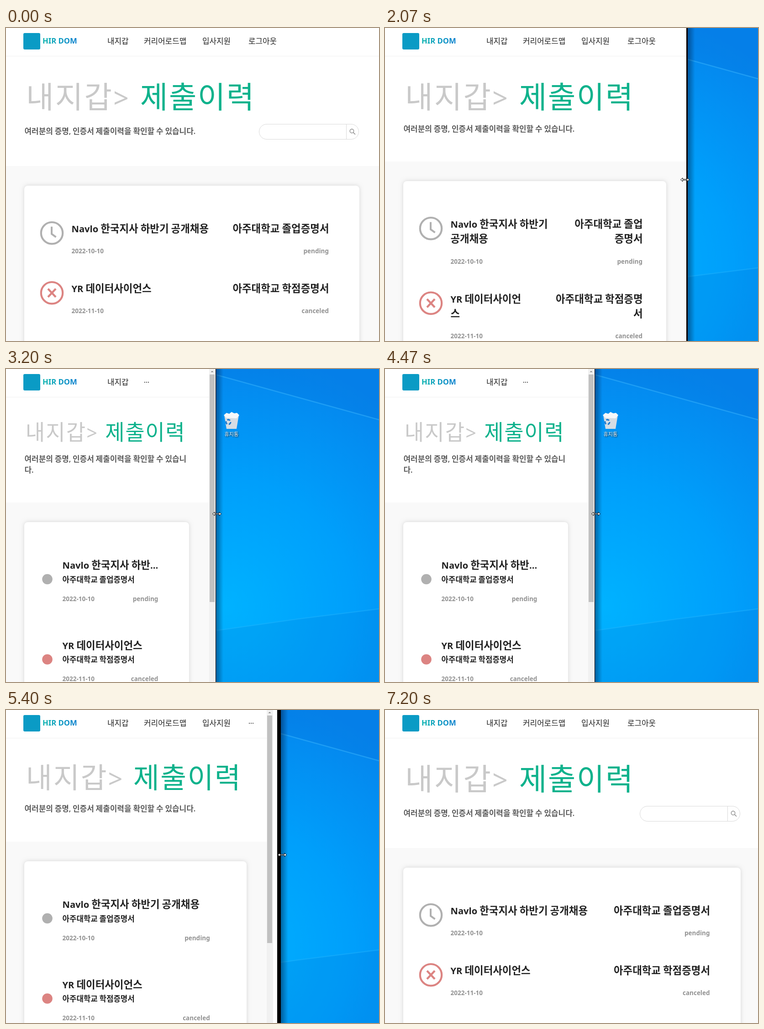
Recreate the animation shown at these times as an HTML page with a canvas. Size 817 by 685 pixels, loop 7270 ms.

```html
<!DOCTYPE html>
<html lang="ko">
<head>
<meta charset="utf-8">
<title>Responsive page</title>
<style>
html, body { margin: 0; width: 100%; height: 100%; overflow: hidden; background: #fff; }
canvas { display: block; }
</style>
</head>
<body>
<canvas id="stage" width="817" height="685"></canvas>
<script>
const ctx = document.getElementById('stage').getContext('2d');
const STAGE_W = 817, STAGE_H = 685, LOOP = 7270, STEP = 200 / 3;

// step, page width, visible right limit, window edge, pointer x, pointer y
const KEYS = [
  [0, 818, 900, 900, 930, 336], [16, 818, 900, 900, 930, 336],
  [17, 816, 840, 840, 850, 336], [18, 816, 840, 840, 850, 336],
  [29, 693, 694, 697, 690, 334], [31, 660, 660, 663, 657, 332],
  [41, 528, 527, 528, 527, 321], [48, 445, 459, 460, 462, 317],
  [67, 445, 459, 460, 462, 317], [77, 522, 544, 549, 552, 317],
  [81, 571, 594, 602, 605, 317], [88, 676, 697, 709, 713, 317],
  [90, 711, 733, 748, 752, 317], [99, 820, 860, 880, 890, 317],
  [105, 820, 860, 880, 890, 317], [108, 823, 900, 900, 930, 317]
];

const ROWS = [
  { title: 'Navlo 한국지사 하반기 공개채용', doc: '아주대학교 졸업증명서', date: '2022-10-10', status: 'pending', color: '#b0b0b0' },
  { title: 'YR 데이터사이언스', doc: '아주대학교 학점증명서', date: '2022-11-10', status: 'canceled', color: '#dc8482' }
];
// label, x, page width needed to show it
const MENU = [['내지갑', 222, 0], ['커리어로드맵', 302, 462], ['입사지원', 430, 558], ['로그아웃', 531, 613]];
const NOTE = '여러분의 증명, 인증서 제출이력을 확인할 수 있습니다.';
const TITLE_SIZE = 22.4, NOTE_SIZE = 16.95;

function poseAt(step) {
  const next = KEYS.findIndex(k => k[0] >= step);
  if (next <= 0) return KEYS[0].slice(1);
  const a = KEYS[next - 1], b = KEYS[next], u = (step - a[0]) / (b[0] - a[0]);
  return a.slice(1).map((v, i) => Math.round(v + (b[i + 1] - v) * u));
}

function rect(x, y, w, h, color) {
  ctx.fillStyle = color;
  ctx.fillRect(x, y, w, h);
}

function path(points, closed) {
  ctx.beginPath();
  points.forEach(([x, y]) => ctx.lineTo(x, y));
  if (closed) ctx.closePath();
}

function fillShape(points, color) {
  path(points, true);
  ctx.fillStyle = color;
  ctx.fill();
}

function stroke(points, color, width) {
  path(points);
  ctx.strokeStyle = color;
  ctx.lineWidth = width;
  ctx.stroke();
}

function circle(x, y, r) {
  ctx.beginPath();
  ctx.arc(x, y, r, 0, Math.PI * 2);
}

// Latin runs are set slightly smaller than Hangul runs.
function runs(str, size, weight) {
  return (str.match(/[!-~]+|[^!-~]+/g) || []).map(part => {
    const font = /[!-~]/.test(part)
      ? `${weight} ${size * 0.9}px "Noto Sans", "Open Sans", sans-serif`
      : `${weight} ${size}px "Noto Sans CJK KR", "Noto Sans CJK", sans-serif`;
    ctx.font = font;
    return { part, font, width: ctx.measureText(part).width };
  });
}

const widthOf = (str, size, weight) => runs(str, size, weight).reduce((sum, r) => sum + r.width, 0);

// y is the vertical middle of the Hangul glyphs
function text(str, x, y, size, weight, color, alignRight) {
  const list = runs(str, size, weight);
  if (alignRight) x -= list.reduce((sum, r) => sum + r.width, 0);
  ctx.fillStyle = color;
  for (const r of list) {
    ctx.font = r.font;
    ctx.fillText(r.part, x, y + size * 0.36);
    x += r.width;
  }
}

function wrap(str, max, size) {
  const lines = [];
  let line = '';
  for (const ch of str) {
    // punctuation stays with the character before it
    if (line && ch !== '.' && widthOf((line + ch).trim(), size, 700) > max) {
      lines.push(line.trim());
      line = '';
    }
    line += ch;
  }
  return [...lines, line.trim()];
}

function drawDesktop() {
  const sky = ctx.createRadialGradient(480, 520, 0, 480, 520, 560);
  sky.addColorStop(0, '#00b2ff');
  sky.addColorStop(0.5, '#009ffb');
  sky.addColorStop(1, '#0584ec');
  rect(400, 0, STAGE_W - 400, STAGE_H, sky);
  fillShape([[400, -4], [817, 111], [817, 0]], 'rgba(0,70,180,.08)');
  fillShape([[400, 581], [640, 547], [817, 525], [817, 685], [400, 685]], 'rgba(0,80,180,.1)');
  stroke([[400, -4], [817, 111]], 'rgba(70,190,255,.4)', 2.5);
  stroke([[400, 581], [640, 547], [817, 525]], 'rgba(50,190,255,.3)', 2.5);
  drawBin();
}

function drawBin() {
  fillShape([[478, 101], [510, 101], [505, 131], [483, 131]], '#d5dde4');
  fillShape([[477, 101], [483, 96], [489, 98], [494, 94], [500, 97], [506, 96], [511, 101], [505, 108], [483, 107]], '#f6f8fa');
  ctx.strokeStyle = '#1b78cf';
  ctx.lineWidth = 3;
  for (let i = 0; i < 3; i++) {
    ctx.beginPath();
    ctx.arc(487, 116, 5, i * 2.094, i * 2.094 + 1.4);
    ctx.stroke();
  }
  ctx.shadowColor = '#000';
  ctx.shadowBlur = 3;
  ctx.shadowOffsetX = ctx.shadowOffsetY = 1;
  text('휴지통', 478.5, 143, 11.2, 400, '#fff');
  ctx.shadowColor = 'transparent';
  ctx.shadowOffsetX = ctx.shadowOffsetY = ctx.shadowBlur = 0;
}

function drawHeader(width) {
  rect(0, 61, width, 1, '#f0f0f0');
  ctx.beginPath();
  ctx.roundRect(38, 11, 37, 36, 3);
  ctx.fillStyle = '#0a9bc5';
  ctx.fill();
  const ink = ctx.createLinearGradient(81, 0, 157, 0);
  ink.addColorStop(0, '#0bb3b0');
  ink.addColorStop(1, '#0a80d0');
  text('HIR DOM', 80, 27.8, 18.5, 700, ink);
  for (const [label, x, need] of MENU) {
    if (width < need) {
      for (let i = 0; i < 3; i++) rect(x + 1 + i * 4, 28, 2, 2, '#555');
      break;
    }
    text(label, x, 28.7, 16.9, 400, '#222');
  }
}

function drawSearch(width) {
  const left = Math.round(554 + 0.7 * (width - 818)) + 0.5, right = width - 45.5;
  ctx.beginPath();
  ctx.roundRect(left, 210.5, right - left, 33, 16.5);
  ctx.strokeStyle = '#d9d9d9';
  ctx.lineWidth = 1;
  ctx.stroke();
  stroke([[right - 27, 210], [right - 27, 244]], '#d9d9d9', 1);
  circle(right - 15, 225.5, 4.2);
  ctx.strokeStyle = '#8c8c8c';
  ctx.lineWidth = 1.4;
  ctx.stroke();
  stroke([[right - 12, 228.5], [right - 7.5, 233]], '#8c8c8c', 1.6);
}

function drawIcon(y, row) {
  const x = 100.5;
  circle(x, y, 23.7);
  ctx.strokeStyle = row.color;
  ctx.lineWidth = 4.2;
  ctx.stroke();
  if (row.status === 'pending') {
    stroke([[x - 0.5, y - 14], [x - 0.5, y + 2], [x + 9, y + 9]], row.color, 4);
  } else {
    stroke([[x - 8.5, y - 9], [x + 8.5, y + 9]], row.color, 4.4);
    stroke([[x + 8.5, y - 9], [x - 8.5, y + 9]], row.color, 4.4);
  }
}

function drawMeta(row, x, right, y) {
  text(row.date, x, y, 15, 600, '#929292');
  text(row.status, right, y, 15, 600, '#929292', true);
}

function drawWideRows(width, top) {
  const right = 564 + 0.905 * (width - 660), room = right - 144 - 45;
  let y = top + 94;
  for (const row of ROWS) {
    const titleW = widthOf(row.title, TITLE_SIZE, 700), docW = widthOf(row.doc, TITLE_SIZE, 700);
    const shrink = Math.min(1, room / (titleW + docW));
    const titleLines = wrap(row.title, titleW * shrink + 0.1, TITLE_SIZE);
    const docLines = wrap(row.doc, docW * shrink + 0.1, TITLE_SIZE);
    titleLines.forEach((line, i) => text(line, 143.5, y + i * 32, TITLE_SIZE, 700, '#222'));
    docLines.forEach((line, i) => text(line, right + 0.5, y + i * 32, TITLE_SIZE, 700, '#222', true));
    const extra = (Math.max(titleLines.length, docLines.length) - 1) * 32.5;
    drawIcon(y + 9.7, row);
    drawMeta(row, 143.5, right, y + 48.8 + extra);
    y += 131 + extra;
  }
}

function drawNarrowRows(width, top) {
  const right = 408 + 0.9 * (width - 528);
  ROWS.forEach((row, i) => {
    const y = top + 94.3 + i * 175.5;
    const room = right - 120;
    let title = row.title;
    if (width < 480 && widthOf(title, TITLE_SIZE, 700) > room) {
      title = wrap(title, room - widthOf('...', TITLE_SIZE, 700), TITLE_SIZE)[0] + '...';
    }
    circle(90.5, y + 30.7, 11.3);
    ctx.fillStyle = row.color;
    ctx.fill();
    text(title, 123.5, y, TITLE_SIZE, 700, '#222');
    text(row.doc, 123.5, y + 31.5, 16.8, 700, '#222');
    drawMeta(row, 123.5, right, y + 73.2);
  });
}

function drawPage(width) {
  const narrow = width < 600, search = width >= 754;
  const size = Math.min(66, 46.1 + 0.127 * (width - 445));
  const lost = 66 - size;
  drawHeader(width);

  const titleY = 151 - 0.63 * lost;
  ctx.letterSpacing = size * 0.045 + 'px';
  text('내지갑>', 40 + 0.06 * size, titleY, size, 400, '#c9c9c9');
  ctx.letterSpacing = size * 0.035 + 'px';
  text('제출이력', 40 + 3.845 * size, titleY, size, 400, '#0eb28c');
  ctx.letterSpacing = '0px';

  const noteY = 221 - 1.22 * lost + (search ? 5 : 0);
  const noteLines = wrap(NOTE, width - 84, NOTE_SIZE);
  noteLines.forEach((line, i) => text(line, 40.5, noteY + i * 24, NOTE_SIZE, 700, '#5c5c5c'));
  if (search) drawSearch(width);

  const sectionY = Math.round(noteY + 71.4 + (noteLines.length - 1) * 24 + (search ? 4.5 : 0));
  rect(0, sectionY, width, STAGE_H, '#f9f9f9');
  const cardY = sectionY + 43;
  ctx.shadowColor = 'rgba(0,0,0,.14)';
  ctx.shadowBlur = 10;
  ctx.beginPath();
  ctx.roundRect(40, cardY, width - 84, 600, 8);
  ctx.fillStyle = '#fff';
  ctx.fill();
  ctx.shadowColor = 'transparent';
  ctx.shadowBlur = 0;
  (narrow ? drawNarrowRows : drawWideRows)(width, cardY);

  // scrollbar
  if (width < 818) {
    rect(width, 0, 14, STAGE_H, '#f1f1f1');
    rect(width + 1, 12, 11, (narrow ? 510 : 537) - 12, '#c1c1c1');
    fillShape([[width + 3.5, 7], [width + 6.5, 4], [width + 9.5, 7]], '#8a8a8a');
  }
}

function drawPointer(x, y) {
  const upper = [[-9.5, 0], [-5, -4], [-5, -1], [5, -1], [5, -4], [9.5, 0]];
  const lower = [[5, 4], [5, 1], [-5, 1], [-5, 4]];
  fillShape([...upper, ...lower].map(([dx, dy]) => [x + dx, y + dy]), '#fff');
  ctx.strokeStyle = '#000';
  ctx.lineWidth = 1;
  ctx.stroke();
}

function render(time) {
  const [width, limit, edge, pointerX, pointerY] = poseAt(Math.floor((time % LOOP + 4) / STEP));
  drawDesktop();
  const shade = ctx.createLinearGradient(edge, 0, edge + 16, 0);
  shade.addColorStop(0, 'rgba(0,20,50,.45)');
  shade.addColorStop(1, 'rgba(0,20,50,0)');
  rect(edge, 0, 16, STAGE_H, shade);
  rect(0, 0, edge, STAGE_H, '#000');
  ctx.save();
  ctx.beginPath();
  ctx.rect(0, 0, limit, STAGE_H);
  ctx.clip();
  rect(0, 0, limit, STAGE_H, '#fff');
  drawPage(width);
  ctx.restore();
  drawPointer(pointerX, pointerY);
}

const start = performance.now();
function tick() {
  render(performance.now() - start);
  requestAnimationFrame(tick);
}
tick();
</script>
</body>
</html>
```
